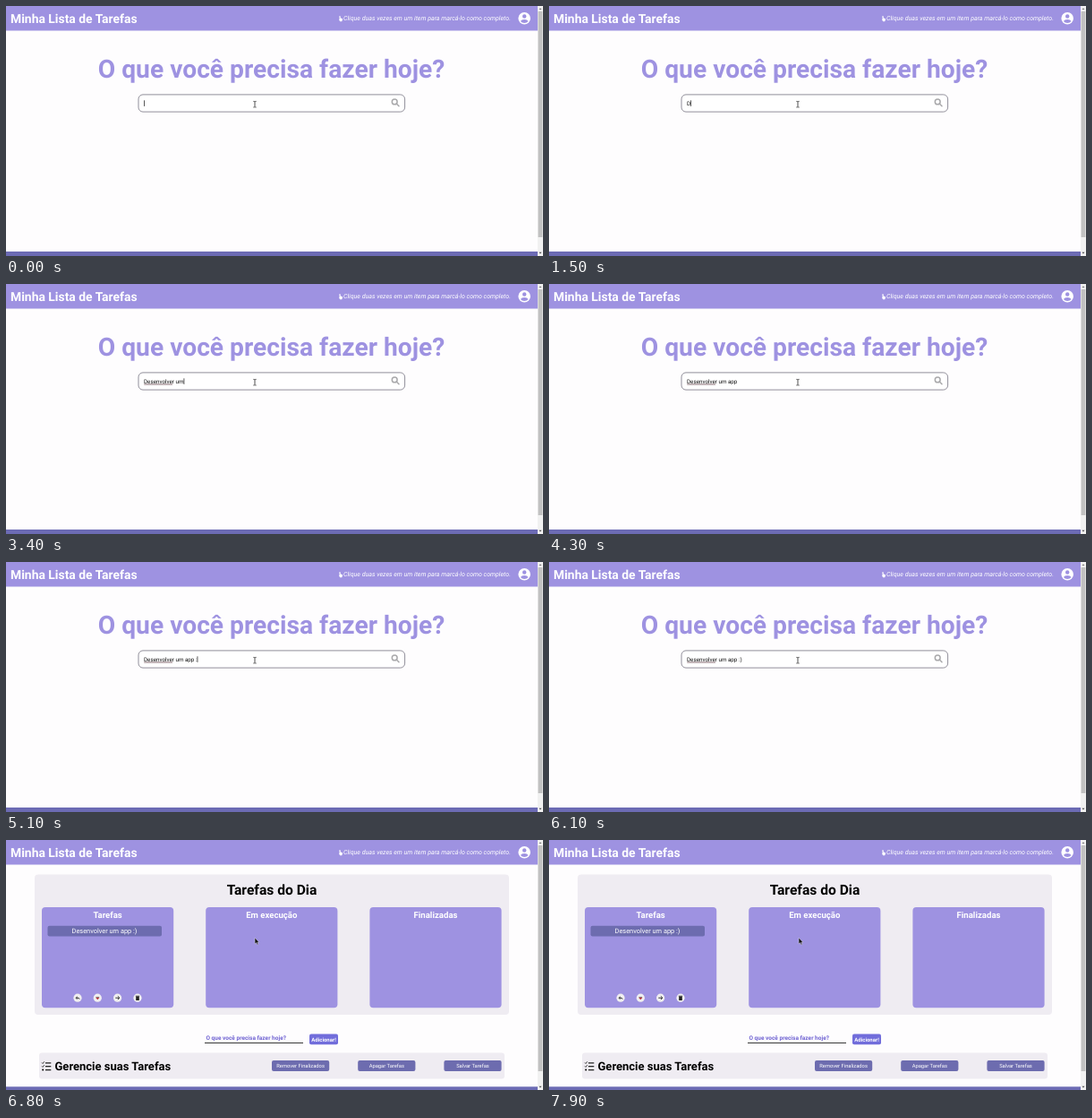
These frames come from a looping animation (600 px wide and 279 px high, 8 s). An HTML page:

```html
<!DOCTYPE html>
<html lang="pt">
<head>
<meta charset="utf-8">
<title>Minha Lista de Tarefas</title>
<style>
  html, body { margin: 0; width: 100%; height: 100%; overflow: hidden; background: #fefdfe; }
  svg { display: block; width: 600px; height: 279px; }
  text { font-family: Roboto, Arial, sans-serif; text-rendering: geometricPrecision; white-space: pre; }
  .b { font-weight: 700; }
  .mid { text-anchor: middle; }
  .w { fill: #fff; }
  .lilac { fill: #9e92e1; }
  .dark { fill: #6d6caf; }
  .panel { fill: #efecf2; }
  .line { fill: none; stroke: #222; }
</style>
</head>
<body>
<svg viewBox="0 0 600 279">
  <rect width="600" height="279" fill="#fefdfe"/>

  <g id="ask">
    <text class="b mid lilac" x="296.5" y="80" font-size="28.2">O que você precisa fazer hoje?</text>
    <rect x="148" y="98.9" width="297.6" height="19.2" rx="5" fill="#fff" stroke="#85838f" stroke-width=".9"/>
    <g fill="none" stroke="#a9a9ab" stroke-width="1.5">
      <circle cx="434.2" cy="106.9" r="2.9"/>
      <path d="M436.3 109L439 111.7" stroke-linecap="round"/>
    </g>
    <text id="typed" x="154" y="110.8" font-size="6.25" fill="#111"></text>
    <path id="spell" d="M154.3 112H186" stroke="#553038" stroke-width=".7"/>
    <rect id="caret" y="105.3" width=".7" height="6.6" fill="#111"/>
    <rect y="274" width="594" height="5" fill="#6c6bb4"/>
  </g>

  <g id="board">
    <rect class="panel" x="32" y="38.5" width="530" height="156.5" rx="4"/>
    <text class="b mid" x="297" y="60.7" font-size="15.6">Tarefas do Dia</text>
    <g id="columns"></g>
    <rect class="dark" x="46.5" y="95.8" width="127.5" height="11.8" rx="2"/>
    <text class="mid w" x="110" y="104.2" font-size="7.4">Desenvolver um app :)</text>

    <g fill="#f0eff0">
      <circle cx="80" cy="176.2" r="4.6"/>
      <circle cx="102.3" cy="176.2" r="4.6"/>
      <circle cx="124.6" cy="176.2" r="4.6"/>
      <circle cx="147" cy="176.2" r="4.6"/>
    </g>
    <path d="M77.4 176.3L79.6 174.3V175.5Q82.4 175.5 82.6 178Q81.4 176.9 79.6 177V178.3Z" fill="#555"/>
    <path d="M100 175.7H104.6L102.3 178.3Z" fill="#b8333c"/>
    <path d="M100.6 175.4H104" stroke="#555" stroke-width=".7"/>
    <path class="line" d="M122.3 176.2H126.7M124.9 174.3L126.8 176.2L124.9 178.1" stroke-width=".9"/>
    <path d="M144.8 173.7H149.2V174.5H144.8ZM145.2 174.8H148.8V179H145.2Z" fill="#222"/>

    <text class="b" x="223.5" y="222.8" font-size="6.5" fill="#6f62d2">O que você precisa fazer hoje?</text>
    <path class="line" d="M222 226.5H332" stroke-width=".9"/>
    <rect x="339" y="216.6" width="32" height="11.6" rx="2" fill="#716ddb"/>
    <text class="b mid w" x="355" y="224.5" font-size="6">Adicionar!</text>

    <rect class="panel" x="37" y="237.5" width="520" height="29" rx="3"/>
    <path class="line" d="M44 248.8H50.3M44 252.7H50.3M44 256.6H50.3" stroke-width="1.3"/>
    <path class="line" d="M40 248.5L41 249.5L42.8 247.3M40 252.4L41 253.4L42.8 251.2" stroke-width=".9"/>
    <circle cx="41.2" cy="256.6" r="1"/>
    <text class="b" x="54.5" y="256.8" font-size="13">Gerencie suas Tarefas</text>
    <g id="buttons"></g>
    <rect y="275.3" width="594" height="3.7" fill="#6c6bb4"/>
  </g>

  <g id="header">
    <rect class="lilac" width="594" height="27.5"/>
    <text class="b w" x="5" y="18.7" font-size="13.9">Minha Lista de Tarefas</text>
    <path class="w" d="M372.4 11.2Q373.2 10.6 373.7 11.6V13.4L375.9 14V15.6L375.2 17.2H373.2L371.9 15L372.6 14.8Z"/>
    <text class="w" x="377" y="16.3" font-size="7.03" font-style="italic">Clique duas vezes em um item para marcá-lo como completo.</text>
    <circle class="w" cx="579.2" cy="13.8" r="6.8"/>
    <circle class="lilac" cx="579.2" cy="11.5" r="2.2"/>
    <path class="lilac" d="M574.9 16.9Q575.8 14.9 579.2 14.9Q582.6 14.9 583.5 16.9Q582 19 579.2 19Q576.4 19 574.9 16.9Z"/>
  </g>

  <rect x="594" width="6" height="279" fill="#f1f1f1"/>
  <rect x="594.6" y="6" width="4.8" height="252" fill="#c1c1c1"/>
  <path d="M595.5 4L597 2.2L598.5 4Z" fill="#777"/>
  <path d="M595.5 274.8L597 276.6L598.5 274.8Z" fill="#444"/>

  <path id="beam" class="line" d="M276.4 106.4H277.3L278 107L278.7 106.4H279.6M278 107V112.4M276.4 113H277.3L278 112.4L278.7 113H279.6" stroke-width=".8"/>
  <path id="arrow" d="M278.1 109.2V116L279.7 114.6L280.8 117L281.8 116.5L280.8 114.2H282.8Z" fill="#111" stroke="#fff" stroke-width=".35"/>
</svg>
<script>
const LOOP = 8000, SUBMIT = 6700, SWITCH = 6800, NUDGE = 7800;
const TEXT = "Desenvolver um app :)";
// [ms, letters typed, caret visible]
const STEPS = [
  [0, 0, 1], [600, 0, 0], [1200, 0, 1], [1500, 1, 1], [1800, 2, 1], [1900, 3, 1],
  [2200, 4, 1], [2300, 5, 1], [2400, 6, 1], [2500, 7, 1], [2600, 8, 1], [2700, 9, 1],
  [2800, 10, 1], [2900, 11, 1], [3000, 12, 1], [3200, 13, 1], [3400, 14, 1],
  [3500, 15, 1], [3600, 16, 1], [3700, 17, 1], [3800, 18, 1], [4300, 18, 0],
  [4700, 19, 1], [5000, 20, 1], [5500, 21, 1], [6100, 21, 0], [6600, 21, 1], [SUBMIT, 21, 0]
];

const $ = id => document.getElementById(id);
const show = (id, on) => $(id).setAttribute("visibility", on ? "visible" : "hidden");

$("columns").innerHTML = ["Tarefas", "Em execução", "Finalizadas"].map((name, i) => {
  const x = 40 + i * 183.2;
  return `<rect class="lilac" x="${x}" y="75" width="147.2" height="112.3" rx="4"/>
    <text class="b mid w" x="${x + 73.6}" y="86.6" font-size="9.6">${name}</text>`;
}).join("");

$("buttons").innerHTML = ["Remover Finalizados", "Apagar Tarefas", "Salvar Tarefas"].map((name, i) => {
  const x = 297 + i * 96.2;
  return `<rect class="dark" x="${x}" y="246" width="64.2" height="12" rx="2"/>
    <text class="mid w" x="${x + 32.1}" y="254.1" font-size="5.8">${name}</text>`;
}).join("");

function draw(t) {
  const [, count, caret] = STEPS.filter(s => s[0] <= t).pop();
  const asking = t < SWITCH;
  $("ask").style.display = asking ? "" : "none";
  $("board").style.display = asking ? "none" : "";
  if (asking) {
    $("typed").textContent = TEXT.slice(0, count);
    $("caret").setAttribute("x", 154.2 + (count ? $("typed").getComputedTextLength() : 0));
    show("caret", caret);
    show("spell", count > 11);
  }
  show("beam", t < SUBMIT);
  show("arrow", t >= SUBMIT);
  $("arrow").setAttribute("transform", `translate(${t >= NUDGE ? 1 : 0} 0)`);
}

const start = performance.now();
function tick() {
  draw((performance.now() - start) % LOOP);
  requestAnimationFrame(tick);
}
tick();
</script>
</body>
</html>
```
